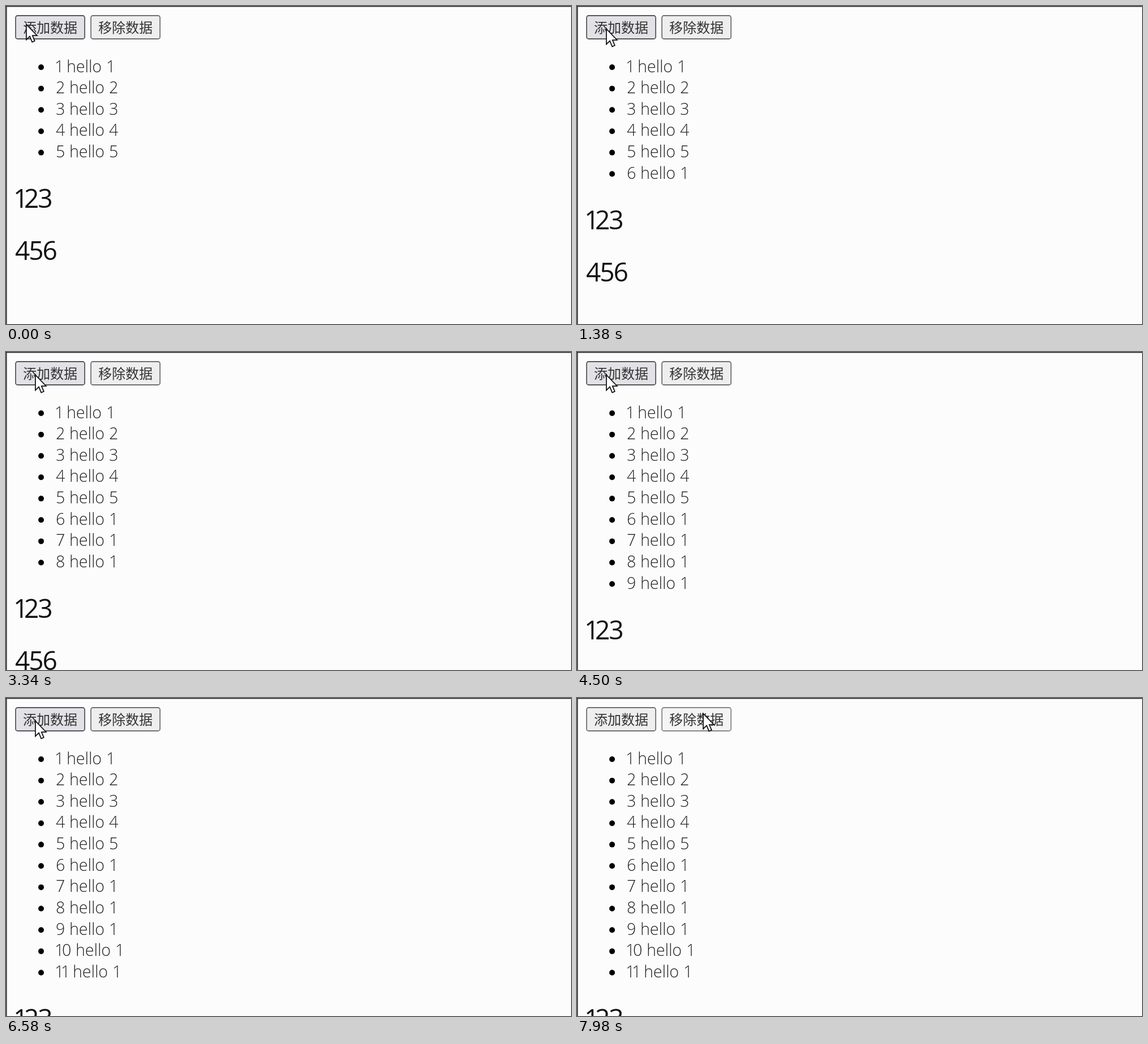
An HTML page with a canvas for the animation above (8000 ms loop, 998 px wide and 561 px high).

```html
<!DOCTYPE html>
<html lang="zh">
<head>
<meta charset="utf-8">
<title>List demo</title>
<style>
  html, body { margin: 0; width: 100%; height: 100%; overflow: hidden; background: #fcfcfd; }
  canvas { display: block; width: 998px; height: 561px; }
</style>
</head>
<body>
<canvas id="stage" width="998" height="561"></canvas>
<script>
const ctx = document.getElementById('stage').getContext('2d');
const LOOP = 8000;
const ROW = 37.65;
const PRESS = 110;
const LATIN = '"Open Sans", "Noto Sans", sans-serif';
const CJK = '"Noto Sans CJK SC", "Noto Sans CJK", sans-serif';

const clicks = [1340, 2360, 3340, 4300, 5260, 6220];
const removePress = 7900;

// Cursor stops: time, x, y
const path = [
  [0, 35, 31], [100, 35, 31], [560, 51, 39],
  [6760, 51, 39], [7430, 222, 26], [LOOP, 222, 26]
];

const STYLES = {
  idle: ['#eeeeef', '#707073'],
  hover: ['#e2e2e6', '#55555c'],
  pressed: ['#f4f4f5', '#87878a']
};

const buttons = [
  { x: 16, label: '添加数据', isPressed: t => clicks.some(c => t >= c - PRESS && t < c) },
  { x: 149, label: '移除数据', isPressed: t => t >= removePress }
];

function cursorAt(t) {
  const i = path.findIndex((p, n) => n > 0 && t <= p[0]);
  const [t0, x0, y0] = path[i - 1];
  const [t1, x1, y1] = path[i];
  const u = (t - t0) / (t1 - t0);
  const k = u * u * (3 - 2 * u);
  return { x: x0 + (x1 - x0) * k, y: y0 + (y1 - y0) * k };
}

function drawButton(b, t, cur) {
  const over = cur.x >= b.x && cur.x <= b.x + 124 && cur.y >= 16 && cur.y <= 59;
  const [fill, line] = STYLES[b.isPressed(t) ? 'pressed' : over ? 'hover' : 'idle'];
  ctx.beginPath();
  ctx.roundRect(b.x + 1, 17, 122, 41, 3.5);
  ctx.fillStyle = fill;
  ctx.fill();
  ctx.strokeStyle = line;
  ctx.lineWidth = 1.8;
  ctx.stroke();
  ctx.font = `300 24px ${CJK}`;
  ctx.fillStyle = '#333';
  ctx.fillText(b.label, b.x + 14, 47);
}

// The digit 1 is narrower than the others
function drawDigits(text, x, y, wide, narrow, shift) {
  for (const d of text) {
    const one = d === '1';
    ctx.fillText(d, x - (one ? shift : 0), y);
    x += one ? narrow : wide;
  }
  return x;
}

function drawItem(i) {
  const y = 116.5 + i * ROW;
  ctx.beginPath();
  ctx.arc(62, y - 8.5, 5, 0, Math.PI * 2);
  ctx.fillStyle = '#000';
  ctx.fill();
  ctx.font = `300 28.5px ${LATIN}`;
  ctx.fillStyle = '#222';
  const x = drawDigits(String(i + 1), 88, y, 16, 11, 2) + 8;
  ctx.fillText('hello', x, y);
  drawDigits(String(i < 5 ? i + 1 : 1), x + 70, y, 16, 11, 0);
}

function drawHeading(text, y) {
  ctx.font = `400 46px ${LATIN}`;
  ctx.fillStyle = '#111';
  drawDigits(text, 16, y, 24.3, 16, 3);
}

function drawCursor({ x, y }) {
  ctx.save();
  ctx.translate(x, y);
  ctx.scale(1.75, 1.75);
  ctx.beginPath();
  [[0.5, 0.8], [0.5, 16.2], [4, 12.9], [6.4, 18.6], [9, 17.5], [6.7, 12], [11.3, 12]]
    .forEach(([px, py]) => ctx.lineTo(px, py));
  ctx.closePath();
  ctx.fillStyle = '#fff';
  ctx.fill();
  ctx.strokeStyle = '#111';
  ctx.lineWidth = 1;
  ctx.stroke();
  ctx.restore();
}

function draw(t) {
  ctx.fillStyle = '#fcfcfd';
  ctx.fillRect(0, 0, 998, 561);
  ctx.fillStyle = '#2a2a2a';
  ctx.fillRect(0, 0, 998, 1.5);
  ctx.fillRect(0, 0, 1.5, 561);

  const cur = cursorAt(t);
  const added = clicks.filter(c => t >= c).length;
  buttons.forEach(b => drawButton(b, t, cur));
  for (let i = 0; i < 5 + added; i++) drawItem(i);
  drawHeading('123', 356 + added * ROW);
  drawHeading('456', 448.3 + added * ROW);
  drawCursor(cur);
}

const start = performance.now();
function tick() {
  draw((performance.now() - start) % LOOP);
  requestAnimationFrame(tick);
}
tick();
</script>
</body>
</html>
```
